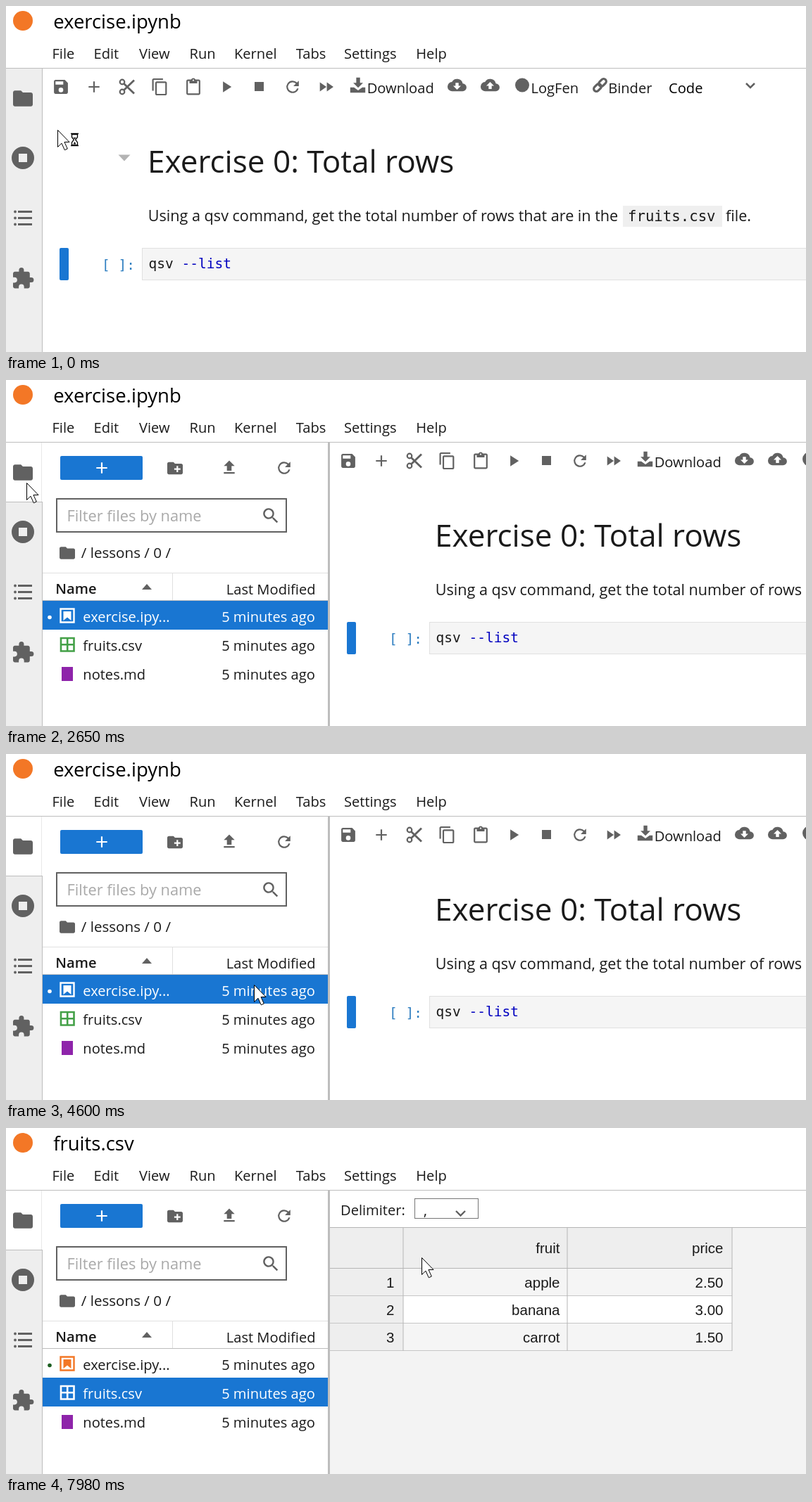
An HTML page that plays this animation: 1136x492 px, repeating every 8 s.

```html
<!DOCTYPE html>
<html lang="en">
<head>
<meta charset="utf-8">
<title>Notebook walkthrough</title>
<style>
html, body { margin: 0; width: 100%; height: 100%; overflow: hidden; background: #fff; }
svg { display: block; width: 1136px; height: 492px; }
text { font: 20.1px "Open Sans", "Noto Sans", sans-serif; fill: #1a1a1a; white-space: pre; }
.title { font-size: 27.5px; fill: #000; }
.head { font-size: 44.1px; }
.body { font-size: 21.6px; }
.hint { font-size: 21.8px; fill: #a9a9a9; }
.bold { font-weight: 600; }
.code { font: 19.5px "DejaVu Sans Mono", monospace; }
.inline { font: 20.7px "DejaVu Sans Mono", monospace; }
.cell { font: 20.5px "Liberation Sans", Arial, sans-serif; }
.end { text-anchor: end; }
</style>
</head>
<body>
<svg id="stage" viewBox="0 0 1136 492"></svg>
<script>
const GREY = '#616161', BLUE = '#1976d2', LINE = '#bdbdbd';

const rect = (x, y, w, h, fill, extra = '') =>
  `<rect x="${x}" y="${y}" width="${w}" height="${h}" fill="${fill}" ${extra}/>`;
const text = (x, y, s, cls = '', extra = '') =>
  `<text x="${x}" y="${y}" class="${cls}" ${extra}>${s}</text>`;
const group = (id, body) => `<g id="${id}">${body}</g>`;
const stroke = (d, width, color = GREY) =>
  `<path d="${d}" fill="none" stroke="${color}" stroke-width="${width}"/>`;
const dot = (x, y, r, fill = GREY) => `<circle cx="${x}" cy="${y}" r="${r}" fill="${fill}"/>`;

// Shapes on a 24 unit grid, placed by their centre.
const SHAPES = {
  folder: 'M10 4H4c-1.1 0-2 .9-2 2v12c0 1.1.9 2 2 2h16c1.1 0 2-.9 2-2V8c0-1.1-.9-2-2-2h-8z',
  newFolder: 'M10 4H4c-1.1 0-2 .9-2 2v12c0 1.1.9 2 2 2h16c1.1 0 2-.9 2-2V8c0-1.1-.9-2-2-2h-8zM19 14h-3v3h-2v-3h-3v-2h3V9h2v3h3z',
  puzzle: 'M20.5 11H19V7c0-1.1-.9-2-2-2h-4V3.5a2.5 2.5 0 0 0-5 0V5H4c-1.1 0-2 .9-2 2v3.8h1.5a2.7 2.7 0 0 1 0 5.4H2V20c0 1.1.9 2 2 2h3.8v-1.5a2.7 2.7 0 0 1 5.4 0V22H17c1.1 0 2-.9 2-2v-4h1.5a2.5 2.5 0 0 0 0-5z',
  save: 'M17 3H5c-1.1 0-2 .9-2 2v14c0 1.1.9 2 2 2h14c1.1 0 2-.9 2-2V7zM12 19a3 3 0 1 1 0-6 3 3 0 0 1 0 6zM15 9H5V5h10z',
  plus: 'M19 13h-6v6h-2v-6H5v-2h6V5h2v6h6z',
  copy: 'M16 1H4C2.9 1 2 1.9 2 3v14h2V3h12zM19 5H8c-1.1 0-2 .9-2 2v14c0 1.1.9 2 2 2h11c1.1 0 2-.9 2-2V7c0-1.1-.9-2-2-2zm0 16H8V7h11z',
  paste: 'M19 2h-4.2a3 3 0 0 0-5.6 0H5c-1.1 0-2 .9-2 2v16c0 1.1.9 2 2 2h14c1.1 0 2-.9 2-2V4c0-1.1-.9-2-2-2zM12 2a1 1 0 1 1 0 2 1 1 0 0 1 0-2zM19 20H5V4h2v3h10V4h2z',
  run: 'M8 5v14l11-7z',
  reload: 'M17.65 6.35A8 8 0 1 0 19.73 14h-2.08A6 6 0 1 1 16.22 7.78L13 11h7V4z',
  forward: 'M4 18l8.5-6L4 6zM13 6v12l8.5-6z',
  upload: 'M5 20h14v-2H5zM9 16h6v-6h4l-7-7-7 7h4z',
  cloudDown: 'M19.35 10A7.5 7.5 0 0 0 5.35 8 6 6 0 0 0 6 20h13a5 5 0 0 0 .35-10zM17 13l-5 5-5-5h3V9h4v4z',
  cloudUp: 'M19.35 10A7.5 7.5 0 0 0 5.35 8 6 6 0 0 0 6 20h13a5 5 0 0 0 .35-10zM14 13v4h-4v-4H7l5-5 5 5z',
  search: 'M15.5 14h-.8l-.3-.3a6.5 6.5 0 1 0-.7.7l.3.3v.8l5 5 1.5-1.5zM9.5 14a4.5 4.5 0 1 1 0-9 4.5 4.5 0 0 1 0 9z',
  download: 'M10 2h5v7h4l-6.5 6.5L6 9h4zM2 15h5l5.5 4 5.5-4h4v7H2z'
};
const icon = (name, x, y, scale = 1.1, fill = GREY) =>
  `<path d="${SHAPES[name]}" fill="${fill}" fill-rule="evenodd" ` +
  `transform="translate(${x} ${y}) scale(${scale}) translate(-12 -12)"/>`;

function header() {
  const menu = { File: 65.5, Edit: 124.5, View: 189, Run: 260.5, Kernel: 324, Tabs: 411.8, Settings: 480, Help: 582.3 };
  return rect(0, 0, 1136, 88, '#fff') + rect(0, 88, 1136, 1, LINE) + dot(24, 21, 14, '#f37726') +
    text(67.2, 32, 'exercise.ipynb', 'title', 'id="title"') +
    Object.entries(menu).map(([s, x]) => text(x, 75, s)).join('');
}

function sidebar() {
  const bullets = [292.5, 301.5, 310.5].map(y => dot(13, y, 1.9) + rect(17, y - 1.5, 20, 3, GREY)).join('');
  return rect(0, 89, 51, 403, '#eee') + rect(51, 89, 1, 403, LINE) +
    rect(0, 89, 51, 84, '#fff', 'id="tab0"') + rect(0, 174, 51, 84, '#fff', 'id="tab1"') +
    group('tabEdge', rect(0, 173, 52, 1, LINE) + rect(50, 89, 1, 84, '#e8e8e8') + rect(51, 89, 1, 84, '#fff')) +
    icon('folder', 24, 131.5, 1.4) +
    `<path d="M8 216a16 16 0 0 1 32 0a16 16 0 0 1-32 0M18 210v12h12v-12z" fill="${GREY}" fill-rule="evenodd"/>` +
    bullets + icon('puzzle', 24, 387.5, 1.4);
}

function notebook() {
  const scissors = stroke('M167.5 110.5L182 124.5M167.5 119.5L182 105.5', 2.8) +
    [108, 122].map(y => `<circle cx="165" cy="${y}" r="3.3" fill="none" stroke="${GREY}" stroke-width="2.2"/>`).join('');
  const link = '<g transform="translate(843.5 112.5) rotate(-45)">' +
    [-11, -1].map(x => rect(x, -3.7, 12, 7.4, 'none', `rx="3.7" stroke="${GREY}" stroke-width="3.2"`)).join('') + '</g>';
  return rect(52, 89, 1084, 403, '#fff') +
    icon('save', 78, 115) + icon('plus', 125, 115) + scissors + icon('copy', 218.5, 115) + icon('paste', 266, 115.5) +
    icon('run', 312.5, 115) + rect(353, 108, 13, 13, GREY) + icon('reload', 407, 115) + icon('forward', 454.5, 115) +
    icon('download', 499.5, 112.5, 1.07) + text(512.7, 124, 'Download') +
    icon('cloudDown', 640.5, 112.5) + icon('cloudUp', 687.5, 112.5) +
    dot(733, 112.5, 10) + text(745.5, 124, 'LogFen') + link + text(855.2, 124, 'Binder') +
    text(941, 124, 'Code', '', 'style="fill:#000"') + stroke('M1051 110l6 6 6-6', 2.5) +
    '<path id="collapser" d="M159.5 211.5h17l-8.5 9z" fill="#b3b3b3"/>' +
    text(201, 237, 'Exercise 0: Total rows', 'head') +
    text(201.8, 306, 'Using a qsv command, get the total number of rows that are in the', 'body') +
    rect(876, 284, 141, 30, '#efefef') + text(883, 306, 'fruits.csv', 'inline') + text(1022, 306, 'file.', 'body') +
    rect(76, 344, 13, 46, BLUE, 'rx="2"') + text(136, 375, '[ ]:', 'code', 'style="fill:#307fc1"') +
    rect(193.5, 344.5, 960, 45, '#f5f5f5', 'stroke="#e0e0e0"') +
    text(202.5, 373, 'qsv <tspan fill="#0000c0">--list</tspan>', 'code');
}

function fileRows(selected) {
  const files = ['exercise.ipy...', 'fruits.csv', 'notes.md'];
  const colors = ['#f37726', '#43a047', '#8e24aa'];
  return files.map((name, i) => {
    const y = 314 + 41 * i, on = i === selected;
    const tint = on ? '#fff' : colors[i], ink = on ? 'style="fill:#fff"' : '';
    const marks = [
      dot(62, 337.5, 2.8, on ? '#fff' : '#1b5e20') + stroke('M77.5 325.5h19v19h-19z', 2.4, tint) +
        `<path d="M81.5 329h11v13l-5.5-4.5-5.5 4.5z" fill="${tint}"/>`,
      stroke('M78 367h18.5v18.5h-18.5zM87.2 367v18.5M78 376.2h18.5', 2.6, tint),
      rect(79, 408, 16, 20, tint)
    ];
    return (on ? rect(52, y, 405, 41, BLUE) : '') + marks[i] +
      text(109.3, y + 30, name, '', ink) + text(438.8, y + 30, '5 minutes ago', 'end', ink);
  }).join('');
}

function panel() {
  return rect(52, 89, 405, 403, '#fff') + rect(457, 89, 3, 403, LINE) +
    rect(77, 108, 117, 34, BLUE, 'rx="2"') + icon('plus', 136, 125, 1.1, '#fff') +
    icon('newFolder', 240, 125.5) + icon('upload', 317, 124.5) + icon('reload', 395, 125) +
    rect(72, 169, 326, 47, '#fff', `stroke="${GREY}" stroke-width="2"`) +
    text(86.5, 201, 'Filter files by name', 'hint') + icon('search', 376, 193, 1.2) +
    icon('folder', 87, 246) + text(106.8, 253, '/ lessons / 0 /', '', 'style="font-size:20.6px"') +
    rect(52, 274, 405, 1, '#e0e0e0') + rect(236, 275, 1, 38, '#e0e0e0') + rect(52, 313, 405, 1, LINE) +
    text(70.3, 304, 'Name', 'bold') + `<path d="M193 298l7-8 7 8z" fill="${GREY}"/>` +
    text(439.5, 305, 'Last Modified', 'end') +
    group('pickNotebook', fileRows(0)) + group('pickTable', fileRows(1));
}

function table() {
  const xs = [564, 797, 1031], ys = [199, 238, 277, 316];
  const rows = [['', 'fruit', 'price'], ['1', 'apple', '2.50'], ['2', 'banana', '3.00'], ['3', 'carrot', '1.50']];
  const ends = [551.5, 786.5, 1018.5];
  return rect(460, 141, 676, 351, '#f3f3f3') + rect(460, 141, 571, 58, '#eee') + rect(460, 199, 104, 117, '#eee') +
    [0, 1, 2].map(i => rect(564, ys[i], 467, 39, i % 2 ? '#fff' : '#f5f5f5')).join('') +
    ys.map(y => rect(460, y, 571, 1, y === 199 ? '#b5b5b5' : '#c6c6c6')).join('') +
    xs.map(x => rect(x - 0.5, 141, 1, 176, '#b5b5b5')).join('') + rect(460, 141, 676, 1, '#b5b5b5') +
    rows.map((row, r) => row.map((s, c) => text(ends[c], r ? 188 + 39 * r : 178, s, 'cell end')).join('')).join('') +
    text(475, 124, 'Delimiter:') + rect(580.5, 100.5, 90, 28, '#fff', 'stroke="#767676"') +
    text(593, 124, ',') + stroke('M639 118l6.5 6.5 6.5-6.5', 2.4);
}

const pointer =
  '<path d="M.5.5V24.5L6 19.2 10.3 28.8 14.3 27 10 17.5H17z" fill="#fff" stroke="#000"/>' +
  group('busy', '<path d="M20.5 6.5h8v4l-2.8 3.7 2.8 3.7v4h-8v-4l2.8-3.7-2.8-3.7z" fill="#fff" stroke="#000" stroke-width="1.3"/>' +
    '<path d="M19 5.5h11M19 22.5h11" stroke="#000" stroke-width="1.6"/><path d="M22.5 11h4l-2 2.5zM22.5 20.5l2-3.5 2 3.5z"/>');

document.getElementById('stage').innerHTML = rect(0, 0, 1136, 492, '#fff') +
  group('notebook', notebook()) + group('table', table()) + group('panel', panel()) + sidebar() + header() +
  `<circle id="click" r="15" fill="#fff000" opacity=".6"/>` + group('pointer', pointer);

// Pointer stops: time, x, y.
const PATH = [
  [0, 73, 176], [20, 73, 176], [400, 51, 155], [780, 33, 135], [830, 32, 134], [870, 29, 134],
  [1310, 29, 134], [1470, 29, 146], [2650, 29, 146], [3100, 33, 195], [3440, 39, 249], [3580, 51, 259],
  [3900, 220, 283], [4200, 436, 314], [4280, 420, 316], [4580, 352, 328], [4700, 352, 328], [4900, 79, 346],
  [5090, 253, 360], [5500, 318, 371], [5830, 338, 378], [5930, 338, 378], [6150, 371, 378], [7520, 371, 378],
  [7520, 578, 181], [7710, 578, 181], [7970, 590, 184], [8000, 590, 184]
];

function pointerAt(t) {
  const i = PATH.findIndex(p => p[0] > t);
  const [t0, x0, y0] = PATH[i - 1], [t1, x1, y1] = PATH[i];
  const k = (t - t0) / (t1 - t0);
  return [x0 + (x1 - x0) * k, y0 + (y1 - y0) * k].map(Math.round);
}

const el = id => document.getElementById(id);
const show = (id, on) => el(id).setAttribute('visibility', on ? 'visible' : 'hidden');
const between = (t, a, b) => t >= a && t < b;

function draw(t) {
  const [x, y] = pointerAt(t);
  const open = t >= 1910;
  const tab = x < 52 ? Math.floor((y - 90) / 85) : -1;

  el('pointer').setAttribute('transform', `translate(${x} ${y})`);
  el('click').setAttribute('transform', `translate(${x} ${y})`);
  show('click', between(t, 1870, 1970) || between(t, 6590, 6680) || between(t, 6770, 6860));
  show('busy', t < 400);
  show('collapser', t < 400);
  show('tab0', open || tab === 0);
  show('tab1', tab === 1);
  show('tabEdge', open);
  el('notebook').setAttribute('transform', `translate(${open ? 408 : 0})`);
  show('notebook', t < 6950);
  show('panel', open);
  show('pickNotebook', open && t < 6590);
  show('pickTable', t >= 6590);
  show('table', t >= 7410);
  el('title').textContent = t < 6950 ? 'exercise.ipynb' : 'fruits.csv';
}

function tick() {
  draw(performance.now() % 8000);
  requestAnimationFrame(tick);
}
tick();
</script>
</body>
</html>
```
